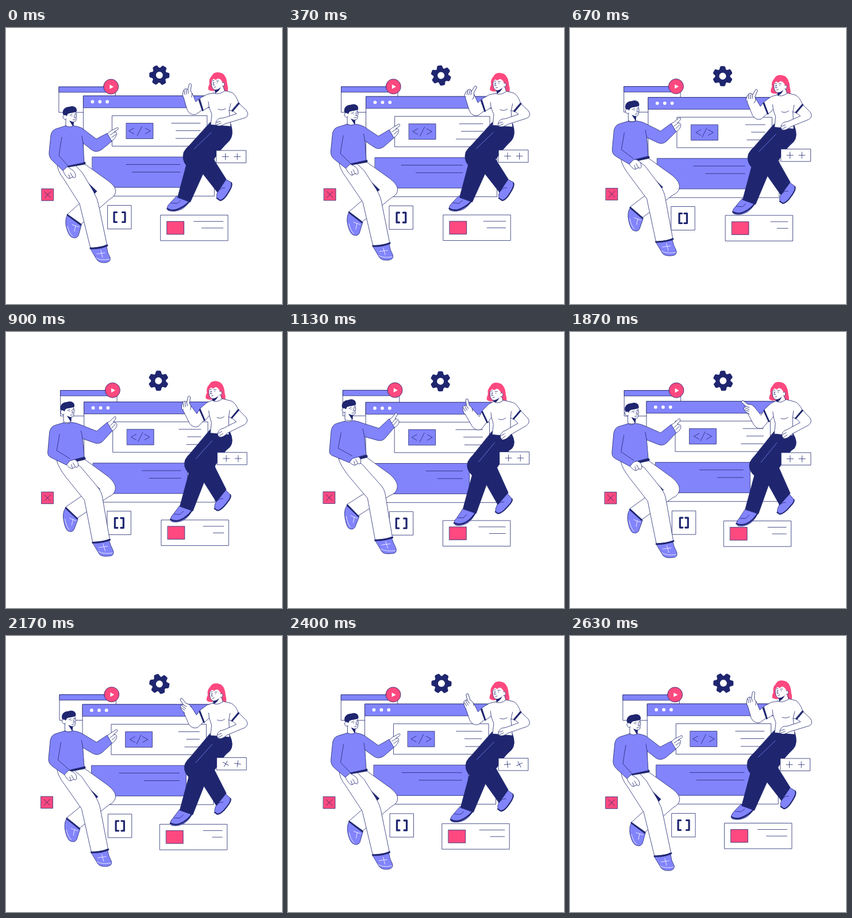
Recreate the animation shown at these times as an HTML page with a canvas. Size 480 by 480 pixels, loop 2.67 s.

```html
<!DOCTYPE html>
<html lang="en">
<head>
<meta charset="utf-8">
<title>Web design team</title>
<style>
html, body { margin: 0; height: 100%; overflow: hidden; background: #fff; }
canvas { display: block; width: 480px; height: 480px; }
</style>
</head>
<body>
<canvas id="stage" width="480" height="480"></canvas>
<script>
const ctx = document.getElementById('stage').getContext('2d');
const LOOP = 2670, TAU = Math.PI * 2;
const NAVY = '#1f266f', BLUE = '#8284fc', PINK = '#fd4980', WHITE = '#fff';
const { sin, cos } = Math;

// Blend two paths that share the same commands.
function blend(a, b, p) {
  const ends = b.match(/-?[\d.]+/g);
  let i = 0;
  return a.replace(/-?[\d.]+/g, v => (+v + (ends[i++] - v) * p).toFixed(2));
}
function draw(d, fill, stroke = NAVY, width = 0.8) {
  const path = new Path2D(d);
  if (fill) { ctx.fillStyle = fill; ctx.fill(path); }
  if (stroke) { ctx.strokeStyle = stroke; ctx.lineWidth = width; ctx.stroke(path); }
}
const box = (x, y, w, h, fill) => draw(`M${x} ${y}h${w}v${h}h${-w}Z`, fill);
function disc(x, y, r, fill, stroke = null) {
  draw(`M${x - r} ${y}a${r} ${r} 0 1 0 ${2 * r} 0a${r} ${r} 0 1 0 ${-2 * r} 0Z`, fill, stroke);
}
function at(x, y, degrees, paint) {
  ctx.save();
  ctx.translate(x, y);
  ctx.rotate(degrees * TAU / 360);
  paint();
  ctx.restore();
}
const textLine = (right, y, length) => draw(`M${right} ${y}h${-length}`);
const swing = a => (1 - cos(a)) / 2;
const ease = k => { k = Math.min(1, Math.max(0, k)); return k * k * (3 - 2 * k); };

function backWindow(p) {
  at(92.3 + 3.6 * p, 102.3 - p, 0, () => {
    box(0, 0, 98, 44.5, WHITE);
    box(0, 0, 98, 9.5, BLUE);
    disc(90.3, -0.3, 13, PINK, NAVY);
    draw('M88 -3.8L95 0L88 3.8Z', WHITE, null);
  });
}

function mainWindow(a) {
  at(134.8 + 1.5 * sin(a), 118 + 4.4 * swing(a + 0.2), 0, () => {
    box(0, 0, 227.5, 174.3, WHITE);
    box(0, 0, 227.5, 20.7, BLUE);
    [15.5, 28.5, 41.3].forEach(x => disc(x, 10.2, 2.9, WHITE));
    box(50, 34.5, 165, 53, WHITE);
    box(74.5, 47.5, 46.5, 27, BLUE);
    const s = 17 + 1.8 * cos(2 * a);
    at(97.6, 61, 0, () => {
      draw(`M${9 - s} -5L${-s} 0L${9 - s} 5M4 -8L-4 8M${s - 9} -5L${s} 0L${s - 9} 5`);
    });
    textLine(203, 47.5, 42 + 8 * cos(2 * a));
    textLine(203, 60.5, 33 + 11 * cos(2 * a - 0.6));
    textLine(203, 74, 37 + 12 * cos(2 * a - 1.1));
    box(15.4, 106.2, 164.5, 53, BLUE);
    textLine(168, 119.4, 85 + 22 * cos(a) - 5 * cos(2 * a) - 8 * cos(3 * a));
    textLine(168, 132.6, 60 + 25 * cos(a - 0.35));
  });
}

function gear(a) {
  const turn = 30 * sin(TAU / 4 * Math.min(1, 1.5 * swing(a + 0.35)));
  at(266 + 0.9 * cos(a + 0.6), 84 - 2 * cos(a - 0.1), turn, () => {
    for (let i = 0; i < 6; i++) {
      at(0, 0, i * 60, () => draw('M10 -6L16 -4.5Q17.5 -4 17.5 -2V2Q17.5 4 16 4.5L10 6Z', NAVY, null));
    }
    disc(0, 0, 13, NAVY);
    disc(0, 0, 6, WHITE);
  });
}

function smallCards(a, p) {
  at(61.5 + 1.1 * cos(a - 0.95), 279.7 - 2 * p, 0, () => {
    box(0, 0, 20.5, 20.5, PINK);
    draw('M5 5L15.5 15.5M15.5 5L5 15.5');
  });
  at(177 - 0.8 * sin(a), 308.5 + 4 * p, 0, () => {
    box(0, 0, 41, 41, WHITE);
    const s = 8.1 + 1.4 * cos(2 * a);
    draw(`M${25 - s} 12H${20.5 - s}V29h4.5M${16 + s} 12H${20.5 + s}V29h-4.5`, null, NAVY, 3.2);
  });
  at(269 + 1.5 * sin(a), 327 - 2 * cos(a - 0.6), 0, () => {
    box(0, 0, 117, 44.5, WHITE);
    box(11, 11, 29.5, 22.5, PINK);
    textLine(108.5, 11, 40.5 + 10.5 * cos(2 * a));
    textLine(108.5, 22.5, 28 + 11 * cos(2 * a - 0.6));
  });
}

function plusCard(p, t) {
  at(366 + 2.1 * p, 213 - 4.8 * p, 0, () => {
    box(0, 0, 51.5, 21.5, WHITE);
    [15.5, 36.2].forEach((x, i) => {
      const turn = 90 * ease((t - 1980 - 100 * i) / 500);
      at(x, 10.7, turn, () => draw('M-5.5 0H5.5M0 -5.5V5.5'));
    });
  });
}

function womanLegs(p) {
  const part = (from, to, ...style) => draw(blend(from, to, p), ...style);

  part('M382 262L392 267Q395 272 387 285Q380 298 373 299Q365 296 367 288L369 281Z',
    'M380 284L389 296Q390 300 382 307Q370 320 363 320Q358 318 360 311L364 302Z', BLUE);
  part('M392 268Q395 272 387 285Q380 298 373 299L367 295', 'M389 296Q390 300 382 307Q370 320 363 320L359 317', null, NAVY, 2);
  part('M368 283L376 277L381 277', 'M363 304L368 301L374 300', null);
  part('M385 195L361 228L383 262L368 285L336 245L340 210Z',
    'M388 203L364 238L383 284L364 304L338 254L342 215Z', NAVY);
  part('M297 291L318 300Q315 308 305 314Q292 320 281 316Q277 311 284 304Z',
    'M306 312L327 318Q325 328 315 336Q305 343 294 341Q288 336 296 328Z', BLUE);
  part('M280 313Q290 319 303 312Q313 307 318 301', 'M291 337Q302 342 314 334Q323 327 327 319', null, NAVY, 2.4);
  part('M286 303L297 304L303 299', 'M298 328L307 328L313 322', null);
  part('M355 164L391 166Q397 186 388 196Q372 212 347 243L320 302L298 294L313 238Q305 228 309 215Q313 208 320 202Z',
    'M355 175L387 178Q398 194 390 204Q374 212 352 251L329 319L306 311L322 252Q309 240 314 228Q317 222 322 217Z', NAVY);
  part('M357 181L327 209', 'M360 195L333 230', null, BLUE);
}

function womanBody(a, p) {
  const part = (from, to, ...style) => draw(blend(from, to, p), ...style);

  // Raised arm
  part('M337 122L330 128L324 113L308 117L315 142Q320 152 330 150L343 141Z',
    'M338 139L333 150L319 135L307 145L321 167Q327 176 337 172L347 158Z', WHITE);
  const wave = -12.3 + 20 * cos(a) + 36 * sin(a);
  at(316 - 3 * p, 116 + 23.5 * p, wave, () => {
    draw('M-8 4Q-10 -5 -7 -9Q-4 -12 -1 -9L0 -19Q2 -22 4 -19L4 -8Q9 -3 7 3', WHITE);
    draw('M-7 -7L-5 0M-4 -9L-2 -1M-1 -9L1 -3');
  });

  // Head
  at(-7 * p, 13 * p, 0, () => {
    draw('M358 83Q352 89 354 97Q351 103 352 107Q358 111 365 108L377 110Q381 113 386 109Q387 104 385 98Q384 84 377 79Q363 73 358 83Z', PINK, null);
    draw('M358 86Q356 99 359 104Q362 109 367 107L364 114Q372 119 381 111L378 102L377 88Z', WHITE);
    draw('M363 108Q371 106 374 102Q371 110 364 113Z', NAVY, null);
    draw('M356 94Q355 79 368 78Q383 81 381 99L377 96Q375 89 369 87L365 90L361 88Z', PINK, null);
    draw('M376 95Q380 93 380 98Q379 102 376 101', WHITE);
    draw('M359 92L362 91M366 92L370 92M360 95H361M367 95H368M362 94L360 99L363 99M362 103L365 102', null);
  });

  // Shirt and bent arm
  part('M361 113L350 115L337 122L343 143L353 137L358 150L356 168L391 171L388 143L394 144L405 131Q400 116 393 112L381 109Q370 117 361 113Z',
    'M357 122L349 127L338 139L348 160L354 150L357 162L355 180L386 183L387 150L392 153L404 138Q398 126 390 124L374 120Q364 128 357 122Z', WHITE);
  part('M369 141Q376 144 382 140M353 137L352 128M388 143L391 131', 'M366 153Q372 156 378 151M354 150L353 142M387 150L388 139', null);
  part('M404 130L418 143Q424 152 416 156L382 166Q372 172 366 169Q362 164 370 157L379 156L401 149L393 143Z',
    'M404 137L417 151Q422 158 414 164L387 181Q380 191 373 190Q366 183 374 176L379 173L400 160L392 152Z', WHITE);
  part('M366 164L373 162M367 168L374 165', 'M371 183L377 179M373 188L379 183', null);
  part('M336 125L342 143M405 131L394 144', 'M338 141L347 159M404 138L392 152', null, NAVY, 2.8);
}

function man(p) {
  const part = (from, to, ...style) => draw(blend(from, to, p), ...style);

  // Back leg
  part('M107 325Q103 330 104 342Q107 358 113 363Q122 368 126 361L131 343Z',
    'M103 300Q98 304 98 316Q100 335 105 340Q112 344 116 338L123 321Z', BLUE);
  part('M107 345Q110 358 116 362M115 342L127 346M121 344L119 354', 'M101 319Q103 332 108 338M109 318L120 323M115 320L113 330', null, WHITE);
  part('M107 325L130 342', 'M103 300L122 319', null, NAVY, 3);
  part('M110 240L136 236L178 266Q194 278 190 288Q188 294 180 298L131 341L107 324L150 285Z',
    'M115 222L137 217L178 247Q192 260 190 270Q188 280 178 283L122 318L103 298L145 272Z', WHITE);
  part('M136 263L158 284L154 288L146 280Z', 'M138 244L165 270L160 270L152 263Z', NAVY);

  // Front leg
  part('M147 384L175 380Q176 391 181 399Q183 406 174 408Q162 409 158 403Z',
    'M152 361L181 358Q183 364 188 374Q191 384 181 384Q166 386 163 380Z', BLUE);
  part('M157 400Q164 405 180 402M158 393L172 391M165 387L168 399', 'M162 376Q171 381 187 379M163 369L178 367M170 363L174 375', null, WHITE);
  part('M89 236Q89 248 100 262L128 306L147 383L176 379L162 312Q160 298 152 284L133 252L120 238Z',
    'M88 220Q92 232 106 250L139 288L152 361L182 357L170 283Q169 272 160 263L128 228L112 220Z', WHITE);
  part('M147 383Q162 384 176 378', 'M152 361Q167 361 182 356', null, NAVY, 3);
  part('M107 240L136 235', 'M114 221L136 215', null, NAVY, 5);

  // Head
  at(-5.3 * p, -20 * p, 0, () => {
    draw('M104 150L104 171Q111 175 117 171L117 163Q123 164 122 156L123 153L121 145Z', WHITE);
    draw('M110 161L118 164L117 172Z', NAVY, null);
    draw('M99 150C97 141 104 137 110 137C118 134 124 138 123 145C119 148 112 147 108 149L105 154L101 152Z', NAVY, null);
    draw('M105 152Q99 149 99 155Q101 161 105 158', WHITE);
    draw('M111 152L115 150M119 150L122 149M114 153H115M120 152H121M118 152L121 156L118 156M116 160L120 159', null);
  });

  // Hands
  part('M175 185L182 179L194 173Q197 174 194 177L188 181Q194 180 192 186Q190 193 183 197Z',
    'M174 151L180 148L187 139Q191 138 189 144L186 149Q194 150 193 156Q191 162 184 165Z', WHITE);
  part('M181 186L189 181M184 190L191 185', 'M181 156L187 149M184 160L190 152', null);
  part('M98 246L107 241L114 246Q121 250 121 258Q121 262 116 259L110 262Q104 260 98 246Z',
    'M107 225L111 215L119 213Q128 216 127 224Q126 229 122 227L117 230Q112 230 107 225Z', WHITE);
  part('M112 252L116 259M109 255L111 261', 'M118 220L122 227M115 223L117 229', null);

  // Sweater
  part('M104 170L88 175Q80 177 78 186L75 216Q74 225 82 232L99 248L108 240L136 234L134 200L149 212Q157 218 167 211L184 197L176 183L157 193L132 174Q126 171 117 170Q111 174 104 170Z',
    'M99 154L85 158Q77 160 75 170L72 205Q71 212 77 214L107 226L112 219L136 212L133 181L156 187Q165 189 170 182L185 164L176 149L158 166L128 157Q122 154 112 153Q105 157 99 154Z', BLUE);
  part('M97 190L92 222L108 240M132 188L134 200', 'M92 174L87 201L112 214M130 167L133 181', null);
}

const start = performance.now();
function frame() {
  const t = (performance.now() - start) % LOOP;
  const a = t / LOOP * TAU, p = swing(a);
  ctx.fillStyle = WHITE;
  ctx.fillRect(0, 0, 480, 480);
  ctx.lineCap = ctx.lineJoin = 'round';
  backWindow(p);
  mainWindow(a);
  gear(a);
  smallCards(a, p);
  womanLegs(swing(a - 0.45));
  womanBody(a, swing(a - 0.25));
  plusCard(p, t);
  man(p);
  requestAnimationFrame(frame);
}
frame();
</script>
</body>
</html>
```
